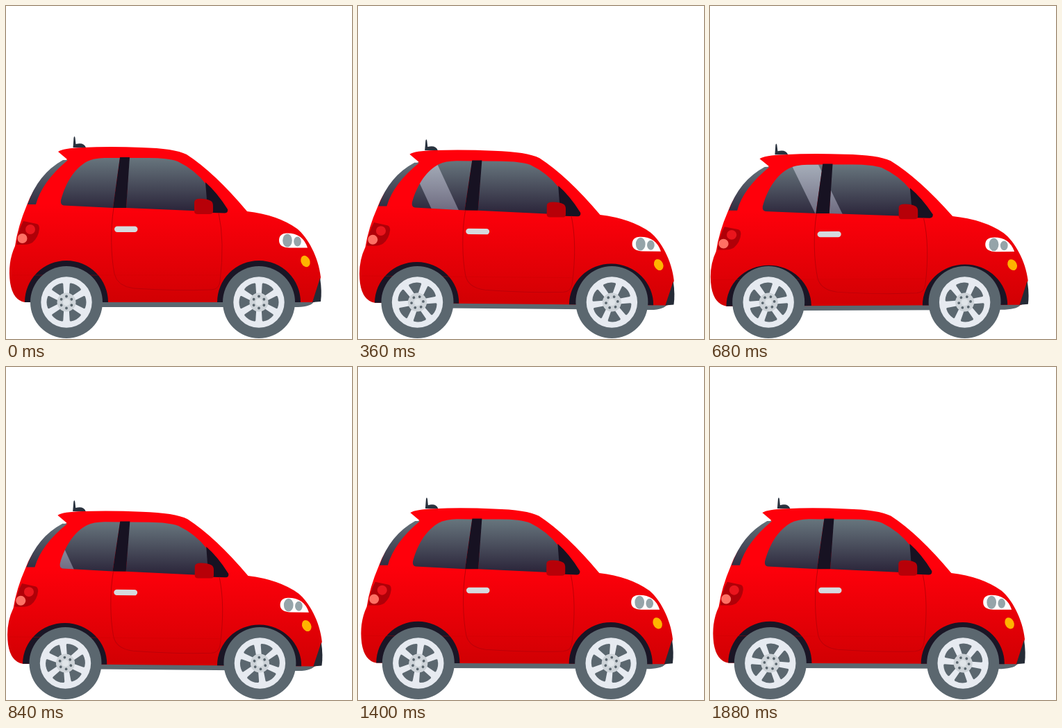
Write an HTML page that moves like this. It is 498 px wide and 480 px high and loops after 1.92 s.

```html
<!DOCTYPE html>
<html lang="en">
<head>
<meta charset="utf-8">
<title>Little red car</title>
<style>
  html, body { margin: 0; width: 100%; height: 100%; overflow: hidden; background: #fff; }
  svg { display: block; width: 498px; height: 480px; }
</style>
</head>
<body>
<svg viewBox="0 0 498 480" xmlns="http://www.w3.org/2000/svg">
  <defs>
    <linearGradient id="paint" gradientUnits="userSpaceOnUse" x1="0" y1="285" x2="0" y2="430">
      <stop offset="0" stop-color="#ff000b"/>
      <stop offset="1" stop-color="#d00003"/>
    </linearGradient>
    <linearGradient id="glass" gradientUnits="userSpaceOnUse" x1="0" y1="219" x2="0" y2="295">
      <stop offset="0" stop-color="#67757d"/>
      <stop offset="1" stop-color="#2b253a"/>
    </linearGradient>
    <linearGradient id="shine" gradientUnits="userSpaceOnUse" x1="0" y1="219" x2="0" y2="295">
      <stop offset="0" stop-color="#eeeeff" stop-opacity=".46"/>
      <stop offset="1" stop-color="#e8e8ff" stop-opacity=".34"/>
    </linearGradient>
    <clipPath id="panes">
      <path id="rearPane" d="M164 219L154 291L83 287.500Q78 287 79 280C86 253 100 233 117 224Q126 219.500 142 219Z"/>
      <path id="frontPane" d="M177 219H205Q233 219 247 224Q272 236 288 257L291 296L173 291Z"/>
    </clipPath>
    <g id="wheel">
      <circle r="52" fill="#5b676f"/>
      <circle r="36.7" fill="#e6eaf0"/>
      <g id="holes" fill="#5b676f"></g>
      <circle r="13.5" fill="#cdd3d8"/>
      <circle r="5" fill="#dfe4e8"/>
      <g id="bolts" fill="#5b676f"></g>
    </g>
  </defs>

  <g id="body">
    <path d="M96.500 204L97.500 190Q98.500 186 99.500 190L100.500 199Q112 196 115 204Z" fill="#29323e"/>
    <path d="M130 426H330V434H130ZM400 426H443Q440 433 420 434H400Z" fill="#5b676f"/>
    <path fill="url(#paint)" d="M75 210Q82 205 110 204Q150 202 195 204Q242 205 260 214
      Q300 240 347 296Q391 301 419 321C434 333 450 362 453 391L444 427H27
      Q10 424 6 399Q2 370 13 346Q17 318 30 287Q44 247 88 221Z"/>
    <path d="M452 392Q455 411 453 426L441 427Z" fill="#252b36"/>
    <path d="M31 286Q46 242 82 222L89 222Q52 253 43 286Z" fill="url(#glass)"/>
    <path d="M27 427a60 60 0 0 1 120 0ZM304 427a60 60 0 0 1 120 0Z" fill="#1a1525"/>

    <use href="#rearPane" fill="url(#glass)"/>
    <use href="#frontPane" fill="url(#glass)"/>
    <g clip-path="url(#panes)" fill="url(#shine)">
      <path class="glint" d="M-38 214H0L38 296H0Z"/>
      <path class="glint" d="M-38 214H0L38 296H0Z"/>
    </g>
    <path d="M164 218H178L173 291H154Z" fill="#171222"/>
    <path d="M287 254Q304 269 319 293Q320 298 315 298.500L297 298L290 291Z" fill="#171222"/>
    <path d="M155 291C150 323 151 360 156 386Q160 404 184 407Q245 411 296 409Q307 408 308 397Q315 340 306 298"
      fill="none" stroke="#bd0008" stroke-width="1"/>
    <path d="M8 388H152M154 388H308" stroke="#c90006" stroke-width=".6" opacity=".6"/>
    <path d="M271 283Q271 279 276 278Q287 277 295 281Q298 283 298 288V296Q298 300 293 300H276Q271 300 271 296Z" fill="#b70008"/>
    <rect x="156" y="317.500" width="33.500" height="8.500" rx="4.200" fill="#d5dade"/>

    <path d="M25 310L44 314Q48 315 48 321Q47 333 38 341Q33 344 26 344H15Q17 324 25 310Z" fill="#b00008"/>
    <circle cx="35" cy="322" r="7" fill="#ea151d"/>
    <circle cx="23.500" cy="335" r="7" fill="#ff7064"/>

    <path d="M393 338Q393 328 404 327.500Q427 327 434 348.500H408Q393 348 393 338Z" fill="#fff"/>
    <ellipse cx="405" cy="338" rx="6.800" ry="9.500" fill="#95a4a9"/>
    <ellipse cx="419.500" cy="339.500" rx="5.300" ry="7" fill="#95a4a9"/>
    <ellipse cx="431" cy="368" rx="6.300" ry="8.500" transform="rotate(-25 431 368)" fill="#ffb400"/>
  </g>
  <use class="wheel" href="#wheel"/>
  <use class="wheel" href="#wheel"/>
</svg>
<script>
  const LOOP = 1920, STEP = 40, BOUNCE = 480, TURNS = 3;
  const MID = 230, AXLE_Y = 427, AXLES = [87, 364];
  const STRETCH = 0.021, SQUASH = 0.0235, DROP = 15.1, TILT = 0.5;
  const GLINT_SPEED = 0.57, GLINT_STARTS = [315, 543];

  const body = document.getElementById('body');
  const wheels = document.querySelectorAll('.wheel');
  const glints = document.querySelectorAll('.glint');

  // Six copies of a shape around the hub, the first one turned by the given angle.
  const spin6 = (shape, first) => Array.from({ length: 6 }, (_, i) =>
    `<g transform="rotate(${first + i * 60})">${shape}</g>`).join('');
  document.getElementById('holes').innerHTML =
    spin6('<path d="M-3 -13L-9 -25Q-9.500 -26.500 -8 -27Q0 -30 8 -27Q9.500 -26.500 9 -25L3 -13Z"/>', 30);
  document.getElementById('bolts').innerHTML = spin6('<circle cy="-8.500" r="1.900"/>', 0);

  function draw(t) {
    const phase = 2 * Math.PI * t / BOUNCE;
    const press = (1 - Math.cos(phase)) / 2;
    const sx = 1 + STRETCH * press;
    const sy = 1 - SQUASH * press;
    const tilt = -TILT * Math.sin(phase);

    body.setAttribute('transform',
      `rotate(${tilt} ${MID} 330) translate(${MID * (1 - sx)} ${DROP * press}) scale(${sx} ${sy})`);
    wheels.forEach((w, i) => {
      const x = MID + (AXLES[i] - MID) * sx;
      w.setAttribute('transform', `translate(${x} ${AXLE_Y}) rotate(${360 * TURNS * t / LOOP})`);
    });
    glints.forEach((g, i) =>
      g.setAttribute('transform', `translate(${GLINT_STARTS[i] - GLINT_SPEED * t} 0)`));
  }

  const start = performance.now();
  function tick() {
    const t = (performance.now() - start) % LOOP;
    draw(Math.floor(t / STEP) * STEP);
    requestAnimationFrame(tick);
  }
  draw(0);
  requestAnimationFrame(tick);
</script>
</body>
</html>
```
